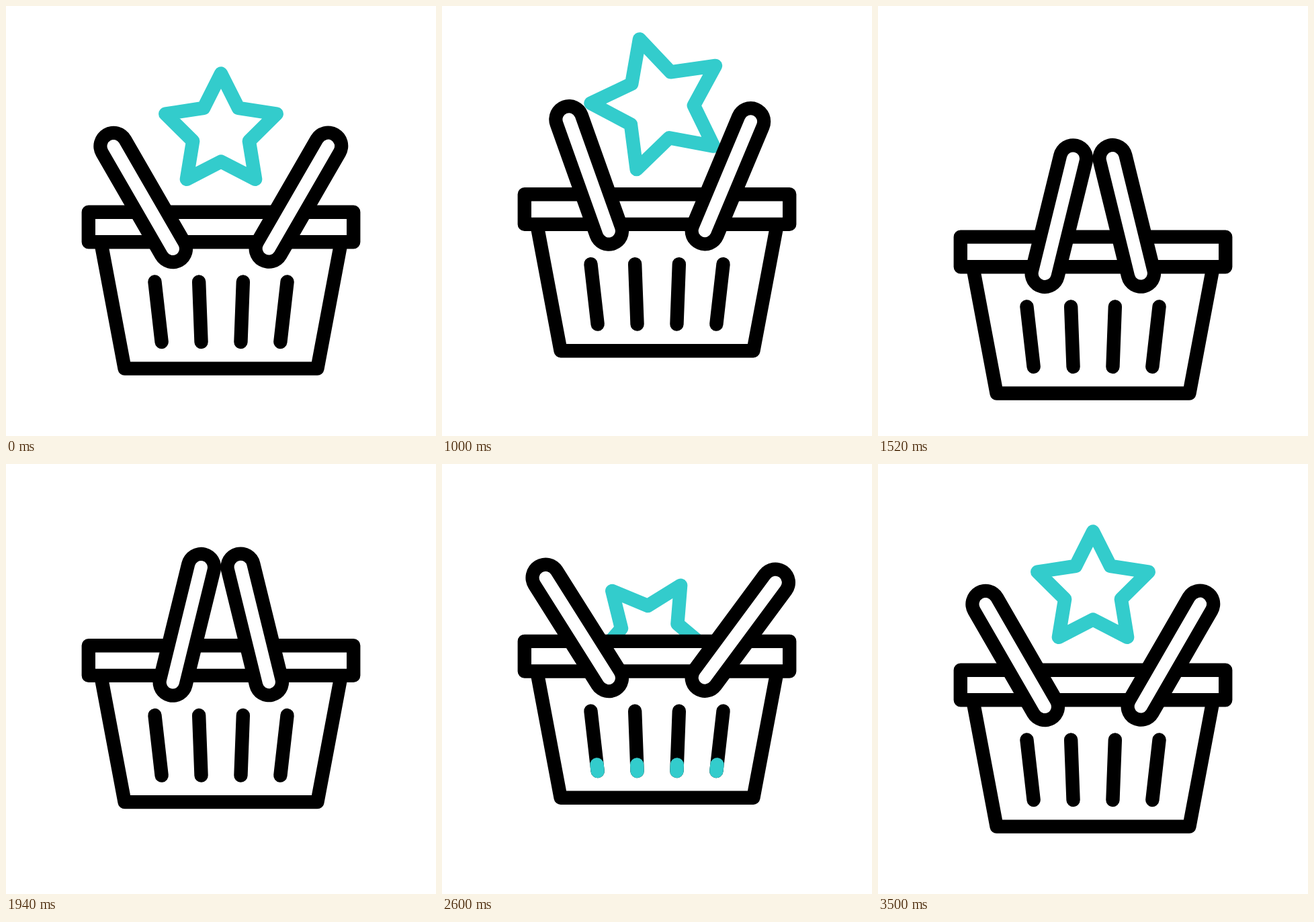
These frames come from a looping animation (640x640 px, 3.6 s). An HTML page:

```html
<!DOCTYPE html>
<html lang="en">
<head>
<meta charset="utf-8">
<title>Basket and star</title>
<style>
  html, body { margin: 0; width: 100%; height: 100%; overflow: hidden; background: #fff; }
  svg { display: block; width: 100vw; height: 100vh; }
  .line { fill: none; stroke: #000; stroke-width: 20.4; stroke-linecap: round; stroke-linejoin: round; }
  .teal { stroke: #33cccc; }
  .outer { stroke-width: 59.6; }
  .inner { stroke: #fff; stroke-width: 19.2; }
</style>
</head>
<body>
<svg viewBox="0 0 640 640">
  <defs>
    <clipPath id="above"><rect id="mask" width="640" height="306"/></clipPath>
    <g id="handle">
      <path class="line outer" d="M0 0V-176.4"/>
      <path class="line inner" d="M0 0V-176.4"/>
    </g>
  </defs>
  <g clip-path="url(#above)"><path id="star" class="line teal"/></g>
  <g id="basket">
    <path class="line" d="M141.5 353L176.6 539.6H463.4L498.5 353"/>
    <rect class="line" x="122.8" y="306.7" width="394.4" height="44.6"/>
    <g id="slits"></g>
    <use id="left" href="#handle"/>
    <use id="right" href="#handle"/>
  </g>
</svg>
<script>
const STEP = 20, STEPS = 180, SLITS = 4;
const $ = id => document.getElementById(id);
const move = (el, value) => el.setAttribute("transform", value);

// Progress 0..1 between steps a and b
const part = (s, a, b) => Math.min(1, Math.max(0, (s - a) / (b - a)));
const ramp = (s, a, b) => {
  const u = part(s, a, b);
  return u * u * (3 - 2 * u);
};

// Jump up, drop under the star's weight, spring up, settle
function basketLift(s) {
  return -56.5 * (ramp(s, 8, 38) - ramp(s, 38, 61))
    + 43 * ramp(s, 61, 70) - 119 * ramp(s, 70, 114) + 76 * ramp(s, 114, 149);
}

// Rest angle, plus a swing outwards, minus the swing that shuts the handle
function handleAngle(s, swing) {
  const open = ramp(s, 8, 37) - ramp(s, 143, 173);
  const shut = ramp(s, 37, 65) - ramp(s, 102, 143);
  return 30 + swing * open - (swing + 43.8) * shut;
}

// Leaps and falls into the basket, then rises from it with a small overshoot
function starPose(s) {
  if (s < 114) return {
    x: 320 - 10 * ramp(s, 8, 38) + 30 * ramp(s, 38, 64),
    y: 187.5 - 67.5 * ramp(s, 8, 42) + 330 * part(s, 42, 70) ** 2,
    spin: -23.5 * ramp(s, 8, 31) + 12 * ramp(s, 31, 66),
    size: 1 + 0.25 * (ramp(s, 8, 38) - ramp(s, 38, 70))
  };
  const rise = ramp(s, 114, 149);
  return {
    x: 302 + 18 * rise,
    y: 322 - 154 * rise + 19.5 * ramp(s, 149, 175),
    spin: 72 * (rise - 1),
    size: 1
  };
}

function starPath({ x, y, spin, size }) {
  const points = Array.from({ length: 10 }, (_, i) => {
    const r = (i % 2 ? 44 : 87) * size, a = (spin + i * 36) * Math.PI / 180;
    return (x + r * Math.sin(a)).toFixed(2) + " " + (y - r * Math.cos(a)).toFixed(2);
  });
  return "M" + points.join("L") + "Z";
}

// Piece of slit i between two fractions, measured from its lower end
function slitPath(i, from, to) {
  const k = i - (SLITS - 1) / 2;
  const point = f => (320 + k * (58.9 + 6.8 * f)) + " " + (500 - 89.5 * f);
  return "M" + point(from) + "L" + point(to);
}

function addSlit(cls, d) {
  const el = document.createElementNS("http://www.w3.org/2000/svg", "path");
  el.setAttribute("class", cls);
  el.setAttribute("d", d);
  $("slits").append(el);
  return el;
}

const fills = [];
for (let i = 0; i < SLITS; i++) {
  addSlit("line", slitPath(i, 0, 1));
  fills.push(addSlit("line teal", ""));
}

function draw(ms) {
  const s = Math.floor(ms / STEP) % STEPS;
  const lift = basketLift(s);
  const head = ramp(s, 121, 165), tail = ramp(s, 131, 175);

  move($("basket"), `translate(0 ${lift})`);
  $("mask").setAttribute("height", 306 + lift);
  move($("left"), `translate(248.3 361.4) rotate(${-handleAngle(s, 16.6)})`);
  move($("right"), `translate(391.3 361) rotate(${handleAngle(s, 22.2)})`);
  $("star").setAttribute("d", starPath(starPose(s)));
  fills.forEach((el, i) => el.setAttribute("d", head > tail ? slitPath(i, tail, head) : ""));
}

const start = performance.now();
function tick() {
  draw(performance.now() - start);
  requestAnimationFrame(tick);
}
tick();
</script>
</body>
</html>
```
